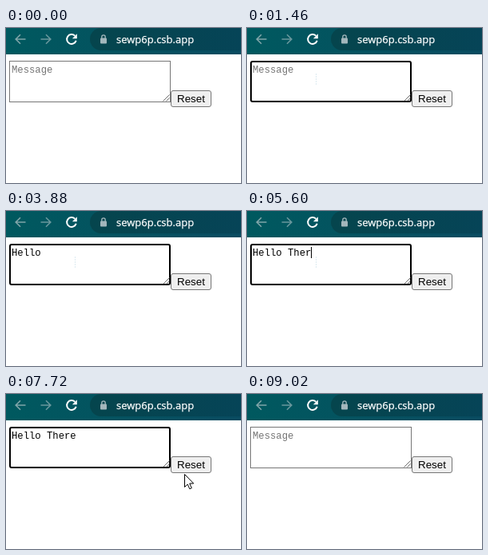
An HTML page for the animation above (9.84 s loop, 294 by 194 pixels).

```html
<!DOCTYPE html>
<html lang="en">
<head>
<meta charset="utf-8">
<title>Reset a message box</title>
<style>
  html, body { margin: 0; width: 100%; height: 100%; overflow: hidden; background: #fff; }
  svg { display: block; width: 294px; height: 194px; }
  text { white-space: pre; }
  .mono { font: 12.22px "Liberation Mono", monospace; }
  .url { font: 13px "Open Sans", "Noto Sans", sans-serif; fill: #fff; stroke: #fff; stroke-width: .25; }
  .label { font: 13.333px "Liberation Sans", Arial, sans-serif; }
  .icon { fill: none; stroke-width: 1.6; }
  .bold { stroke-width: 2; }
  .thin { stroke-width: 1.3; }
</style>
</head>
<body>
<svg viewBox="0 0 294 194">
  <defs>
    <linearGradient id="toolbar">
      <stop offset="0" stop-color="#00595f"/>
      <stop offset="1" stop-color="#084b60"/>
    </linearGradient>
    <linearGradient id="pill">
      <stop offset="0" stop-color="#05454d"/>
      <stop offset="1" stop-color="#064459"/>
    </linearGradient>
  </defs>

  <!-- browser toolbar -->
  <rect width="294" height="33" fill="url(#toolbar)"/>
  <rect x="105" y="0" width="220" height="28" rx="14" fill="url(#pill)"/>
  <path class="icon" stroke="#80a5a9" d="M24.5 14H12.5M18 8.2L12.2 14L18 19.8"/>
  <path class="icon" stroke="#6a989d" d="M43.5 14H55.5M50 8.2L55.8 14L50 19.8"/>
  <path class="icon bold" stroke="#fff" d="M86.2 9.8A5.9 5.9 0 1 0 87.7 15.7"/>
  <path fill="#fff" d="M88.8 7.3V13.2H82.9Z"/>
  <rect x="118" y="12.5" width="8" height="7" rx="1" fill="#a3b7bc"/>
  <path class="icon thin" stroke="#a3b7bc" d="M119.8 13V11A2.2 2.2 0 0 1 124.2 11V13"/>
  <text class="url" x="138" y="19">sewp6p.csb.app</text>

  <!-- form -->
  <rect id="field" fill="#fff"/>
  <path d="M196.5 91.5L204.5 83.5M200.5 91.5L204.5 87.5" stroke="#6b6b6b" fill="none"/>
  <text id="message" class="mono" x="7" y="56"></text>
  <rect id="caret" y="45" width="1" height="14"/>
  <rect id="button" x="206.5" y="78.5" width="50" height="20" rx="2.5"/>
  <text class="label" x="231.5" y="93" text-anchor="middle">Reset</text>

  <!-- mouse -->
  <path id="beam" d="M0.5 -7V8" stroke="#dceaf0" stroke-dasharray="2 1" fill="none"/>
  <path id="arrow" d="M.5 .5V16.5L4.2 13L6.8 18.8L9.3 17.7L6.7 12H11.7Z" fill="#fff" stroke="#000"/>
</svg>
<script>
const LOOP = 9840, BLINK = 640;
const FOCUS = 820, PRESS = 8380, RELEASE = 8660;
const TEXT = "Hello There", CHAR = 7.333;
const keyTimes = [1760, 2120, 2520, 2700, 2920, 3240, 4180, 4580, 5160, 5400, 5800];

// Mouse stops: time, x, y
const stops = [
  [160, 104, 196], [300, 100, 152], [440, 92, 98], [600, 86, 64],
  [7260, 86, 64], [7360, 108, 88], [7480, 150, 122], [7600, 196, 129],
  [7720, 223, 100], [7880, 228, 89], [8060, 226, 84],
  [8800, 226, 84], [8900, 168, 132], [9020, 78, 196]
];

const $ = id => document.getElementById(id);
const set = (id, attrs) => {
  for (const name in attrs) $(id).setAttribute(name, attrs[name]);
};
const show = (id, on) => set(id, { visibility: on ? "visible" : "hidden" });
const inside = ([x, y], left, top, right, bottom) =>
  x >= left && x < right && y >= top && y < bottom;

function mouseAt(t) {
  const next = stops.findIndex(stop => stop[0] > t);
  if (next < 1) return [0, 300];
  const [t0, x0, y0] = stops[next - 1], [t1, x1, y1] = stops[next];
  const k = (t - t0) / (t1 - t0);
  return [Math.round(x0 + (x1 - x0) * k), Math.round(y0 + (y1 - y0) * k)];
}

function draw(t) {
  const focused = t >= FOCUS && t < PRESS;
  const typed = t < RELEASE ? keyTimes.filter(time => time <= t).length : 0;

  set("field", focused
    ? { x: 5, y: 42, width: 200, height: 50, rx: 2, stroke: "#000", "stroke-width": 2 }
    : { x: 4.5, y: 41.5, width: 201, height: 51, rx: 0, stroke: "#767676", "stroke-width": 1 });
  $("message").textContent = typed ? TEXT.slice(0, typed) : "Message";
  set("message", { fill: typed ? "#000" : "#757575" });

  const lastInput = typed ? keyTimes[typed - 1] : FOCUS;
  set("caret", { x: Math.round(7 + typed * CHAR - 0.4) });
  show("caret", focused && Math.floor((t - lastInput) / BLINK) % 2 === 0);

  const mouse = mouseAt(t);
  const overField = inside(mouse, 4, 41, 206, 93);
  const overButton = inside(mouse, 206, 78, 257, 99);
  const pressed = t >= PRESS && t < RELEASE;
  set("button", {
    fill: pressed ? "#f5f5f5" : overButton ? "#e5e5e5" : "#efefef",
    stroke: pressed ? "#8d8d8d" : overButton ? "#4f4f4f" : "#767676"
  });

  for (const id of ["beam", "arrow"]) set(id, { transform: `translate(${mouse})` });
  show("beam", overField);
  show("arrow", !overField && mouse[1] < 194);
}

function tick() {
  const t = performance.now() % LOOP;
  draw(t - t % 20);
  requestAnimationFrame(tick);
}
tick();
</script>
</body>
</html>
```
